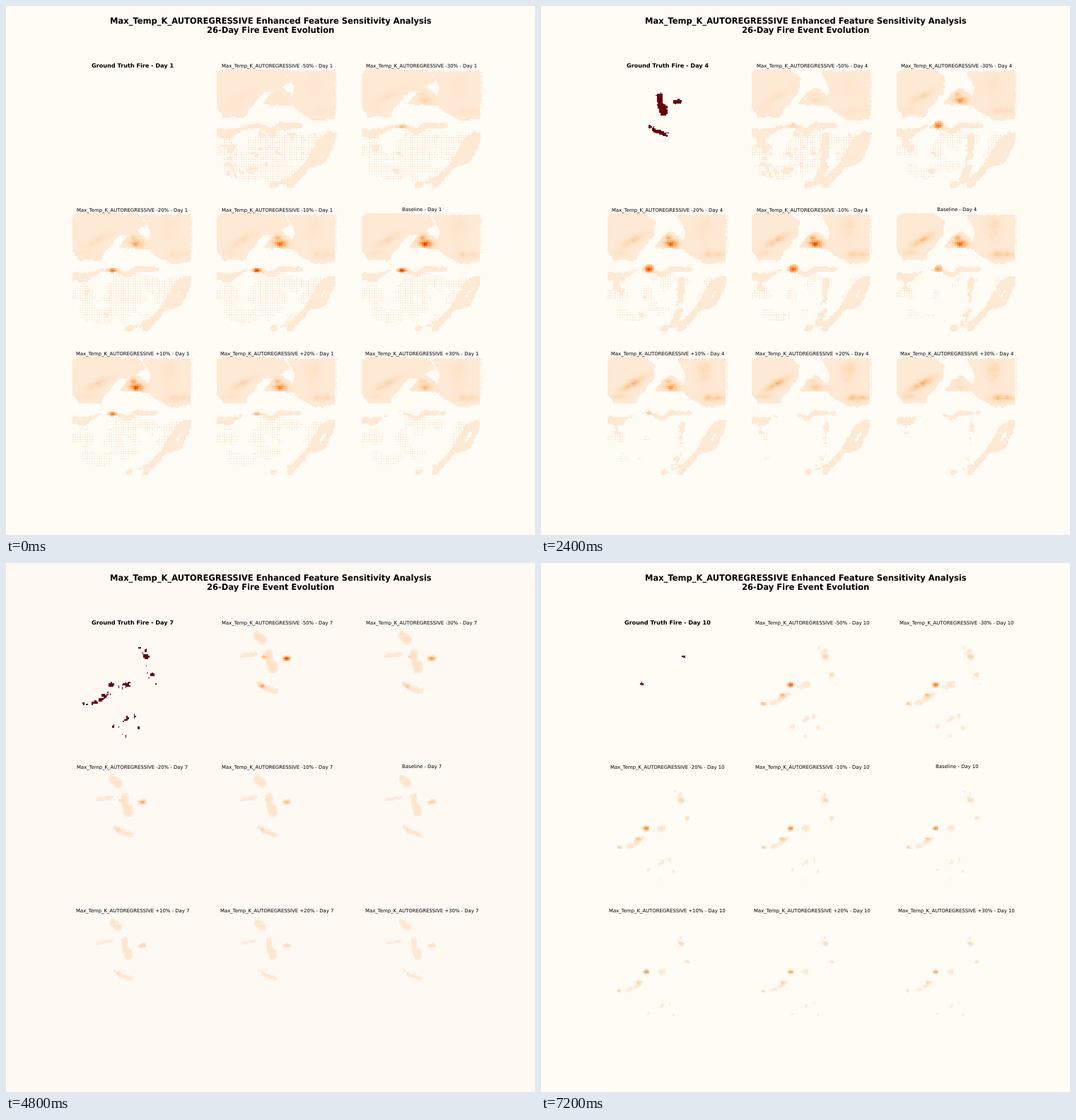
These frames come from a looping animation (748 by 748 pixels, 8 s). A matplotlib script:

```python
import numpy as np
import matplotlib.pyplot as plt
from matplotlib.animation import FuncAnimation
from matplotlib.path import Path

plt.rcParams["font.family"] = "DejaVu Sans"
plt.rcParams["text.hinting"] = "none"
plt.rcParams["text.hinting_factor"] = 8

SIZE = 748
W, H = 170, 167            # panel size in pixels
COLS, ROWS = 100, 98       # grid cells per panel
NAME = "Max_Temp_K_AUTOREGRESSIVE"
STEPS = [None, -50, -30, -20, -10, 0, 10, 20, 30]
LAG = 3                    # late forecasts repeat the fire of three days ago

X, Y = np.meshgrid((np.arange(COLS) + 0.5) * W / COLS,
                   (np.arange(ROWS) + 0.5) * H / ROWS)
CELLS = np.column_stack([X.ravel(), Y.ravel()])
row, col = np.indices((ROWS, COLS))
LATTICE = (row % 2 == 0) & (col % 2 == 0)


def kernel(n, sigma):
    i = np.arange(n)
    k = np.exp(-((i[:, None] - i) / sigma) ** 2 / 2)
    return k / k.sum(1, keepdims=True)


def blur(a, sigma):
    return kernel(ROWS, sigma) @ a @ kernel(COLS, sigma).T


def noise(seed, sigma):
    """Smooth noise, spread evenly over 0..1."""
    a = blur(np.random.default_rng(seed).random((ROWS, COLS)), sigma)
    return a.ravel().argsort().argsort().reshape(a.shape) / a.size


EDGE = noise(3, 1.2)
PATCH = noise(8, 3.5)
CLUMP = noise(5, 0.9)
ROUGH = (EDGE + PATCH) / 2 - 0.5


def polygon(pts):
    return Path(pts).contains_points(CELLS).reshape(X.shape) * 1.0


def stroke(radius, pts):
    """Cells within a radius of a polyline."""
    out = np.zeros(X.shape)
    for (x0, y0), (x1, y1) in zip(pts, pts[1:]):
        dx, dy = x1 - x0, y1 - y0
        t = ((X - x0) * dx + (Y - y0) * dy) / (dx * dx + dy * dy)
        t = np.clip(t, 0, 1)
        out[np.hypot(X - x0 - t * dx, Y - y0 - t * dy) < radius] = 1
    return out


def bump(x, y, rx, ry=None, slant=0):
    a = np.radians(slant)
    u = (X - x) * np.cos(a) + (Y - y) * np.sin(a)
    v = (Y - y) * np.cos(a) - (X - x) * np.sin(a)
    return np.exp(-((u / rx) ** 2 + (v / (ry or rx)) ** 2) / 2)


# Land as (weight on day 1, weight on day 6, mask)
LAND = [(a, b, blur(mask, 1.0)) for a, b, mask in [
    (1.3, 1.3, polygon([(0, 6), (6, 2), (50, 1), (67, 12), (67, 30),
                        (45, 55), (40, 66), (10, 67), (0, 50)])),
    (1.3, 1.3, polygon([(100, 4), (166, 2), (167, 67), (140, 71),
                        (114, 58), (104, 44), (112, 26)])),
    (1.0, 0.8, polygon([(66, 49), (76, 34), (90, 24), (112, 42), (114, 52)])),
    (1.1, -1.0, polygon([(50, 2), (94, 2), (104, 16), (84, 30), (62, 30)])),
    (0.8, 0.9, stroke(6, [(4, 90), (20, 92)])),
    (0.0, 0.7, stroke(6, [(10, 92), (14, 105)])),
    (0.7, 0.6, stroke(4, [(20, 90), (44, 82), (60, 79), (78, 87),
                          (90, 79), (120, 79)])),
    (0.1, 0.85, stroke(6, [(105, 97), (102, 114), (103, 136), (92, 156)])),
    (0.6, 0.7, stroke(3.5, [(78, 163), (105, 156), (122, 142)])),
    (0.85, 0.85, stroke(5, [(104, 163), (134, 128), (152, 99), (164, 93),
                            (160, 108), (150, 126), (134, 134)]))]]
PLAIN = blur(polygon([(6, 104), (40, 90), (145, 88), (126, 134),
                      (100, 162), (46, 162), (16, 142)]), 3)
FRINGE = (X > 167.5) & (row % 2 == 0) & (abs(Y - 31) < 27)


def early_heat(t, s):
    """Two cores that fade and two ridges that grow over the days."""
    def tuned(best, spread):
        return np.exp(-((s - best) / spread) ** 2)

    best = 0.03 - 0.38 * t ** 2
    cores = 0.62 * (1 - t ** 6) * (
        tuned(best, 0.27) * np.maximum(bump(90, 43, 7, 3.5, 8),
                                       0.6 * bump(87, 37, 4, 4))
        + tuned(best - 0.08, 0.24) * bump(57 + 3 * t, 81 - 4 * t,
                                          4, 2 + 2.5 * t))
    ridges = (0.12 + 0.2 * t) * tuned(0.3, 0.65) * (
        bump(36, 38, 12, 3.5, -28) + bump(150, 58, 10, 3.5)
        + 0.5 * bump(18, 56, 8, 2.5) + 0.5 * bump(137, 20, 6, 11))
    return (cores + ridges) * (0.55 + 0.6 * EDGE + 0.25 * LATTICE)


def early(day, s):
    """Widespread risk map; higher sensitivity shrinks the weaker land."""
    t = (day - 1) / 5
    score = 0.15 * PLAIN
    for a, b, mask in LAND:
        score = np.maximum(score, (a + (b - a) * t) * mask)
    light = score > 0.45 + 0.35 * s + 0.6 * ROUGH + 0.06 * LATTICE
    share = 0.12 + 0.5 * (1 - t) ** 2 - (0.6 + 0.5 * t) * s
    light |= LATTICE & (PATCH < share * PLAIN) | FRINGE
    hot = early_heat(t, s)
    return np.where(light | (hot > 0.1), 0.1 + hot, 0)


# Burnt ground: first spots, then a block with streaks, then its outer front
SPOTS = [(6, [(72, 38), (80, 58)]), (3.2, [(96, 45), (103, 45)]),
         (3.2, [(61, 80), (67, 87), (84, 92)])]
BLOCK = [(6.5, [(91, 40), (95, 82)]), (4.5, [(98, 36), (98, 84)]),
         (2.5, [(84, 28), (88, 36), (98, 36)]), (2.8, [(20, 109), (25, 107)]),
         (2.4, [(103, 66), (110, 82)]), (1.5, [(104, 92), (105, 117)]),
         (1.6, [(82, 112), (94, 130)]), (1.8, [(97, 146), (98, 130), (108, 140)])]
BLOCK += [(2.4, [(65, y), (79, y - 8)]) for y in (38, 46, 54, 62, 70)]
BLOCK += [(2.1, [(x, y), (x + 13, y - 9)])
          for x, y in ((73, 97), (76, 104), (72, 151), (79, 144))]
FRONT = [(3, [(84, 27), (102, 34), (105, 50), (109, 68), (116, 80)]),
         (3, [(82, 81), (58, 88), (44, 101), (33, 107), (14, 110)]),
         (2.7, [(50, 141), (66, 140), (72, 131), (88, 126)]),
         (2.4, [(86, 144), (96, 142)]), (1.9, [(70, 154), (80, 157)])]
HAZE = np.maximum(stroke(5, [(57, 12), (65, 19)]),
                  stroke(1.6, [(34, 42), (56, 38)]))


def embers(day):
    """Hot points as x, y, size and glow; two of them creep outward."""
    if day == 4:
        return [(99, 45, 1, 0.6), (64, 84, 1, 0.35), (67, 43, 0.6, 0.35)]
    if day == 5:
        return [(94, 56, 1, 0.3)]
    age = day - 6
    return [(57 - 2 * age, 83 - 0.5 * age, 1, 0.6),
            (103 + 1.4 * age, 42, 1, 0.14), (113, 68, 0.7, 0.08),
            (43, 97, 0.7, 0.24), (16, 109, 0.55, 0.24)]


def burnt(day):
    if day < 4:
        return np.zeros(X.shape)
    paths = {4: SPOTS, 5: BLOCK}.get(day, FRONT)
    strength = 0.75 * CLUMP * np.max(
        [stroke(r * (0.65 + 0.6 * EDGE), pts) for r, pts in paths], axis=0)
    if day > 5:
        for x, y, size, _ in embers(day):
            strength = np.maximum(strength, size * bump(x, y, 3.4, 2.8))
    cut = np.clip(0.3 + 0.18 * (day - 6), 0.12, 0.78)
    return (strength > cut) * 1.0


def late(day, s):
    """Blurred copy of the earlier fire; its glow fades with sensitivity."""
    past = day - LAG
    source = burnt(past)
    if past == 4:
        source = np.maximum(source, HAZE)
    cover = blur(source, 0.9)
    limit = max(0.14, 0.3 + 0.5 * s)
    fade = np.exp(-3 / (past - 3) * (s + 0.5))
    hot = fade * np.sum([glow * bump(x, y, 3, 2.1)
                         for x, y, _, glow in embers(past)], axis=0)
    hot *= 0.8 + 0.3 * CLUMP
    light = 0.06 + 0.1 * np.clip(cover - limit, 0, 1)
    return np.where((cover > limit) | (hot > 0.1), light + hot, 0)


fig = plt.figure(figsize=(SIZE / 100, SIZE / 100), dpi=100)
ax = fig.add_axes([0, 0, 1, 1])
ax.set_axis_off()


def label(x, y, text, px, weight="normal"):
    return ax.text(x, y, text, fontsize=px * 0.72, weight=weight,
                   ha="center", va="baseline", color="black")


label(374, 24.2, NAME + " Enhanced Feature Sensitivity Analysis", 11.55, "bold")
label(374, 37.9, "26-Day Fire Event Evolution", 11.55, "bold")

panels = []
for k, step in enumerate(STEPS):
    x, y = 94 + 204.5 * (k % 3), 90 + 203.2 * (k // 3)
    truth = step is None
    image = ax.imshow(np.zeros((ROWS, COLS)), cmap="Reds" if truth else "Oranges",
                      vmin=0, vmax=1, extent=(x, x + W, y + H, y),
                      interpolation="nearest")
    title = label(x + 84.8, y - 3.3, "", 8.08 if truth else 6.93,
                  "bold" if truth else "normal")
    panels.append((step, image, title))
ax.set_xlim(0, SIZE)
ax.set_ylim(SIZE, 0)
ax.set_aspect("auto")


def caption(step):
    if step is None:
        return "Ground Truth Fire"
    return f"{NAME} {step:+d}%" if step else "Baseline"


def risk(day, step):
    if step is None:
        return burnt(day)
    return (early if day < 7 else late)(day, step / 100)


def update(i):
    day = i + 1
    fig.set_facecolor("#fff9f4" if day == 7 else "#fffbf5")
    for step, image, title in panels:
        title.set_text(f"{caption(step)} - Day {day}")
        image.set_data(np.ma.masked_less_equal(risk(day, step), 0))
    return []


anim = FuncAnimation(fig, update, frames=10, init_func=lambda: update(0),
                     interval=800, repeat=True, repeat_delay=0)
plt.show()
```
